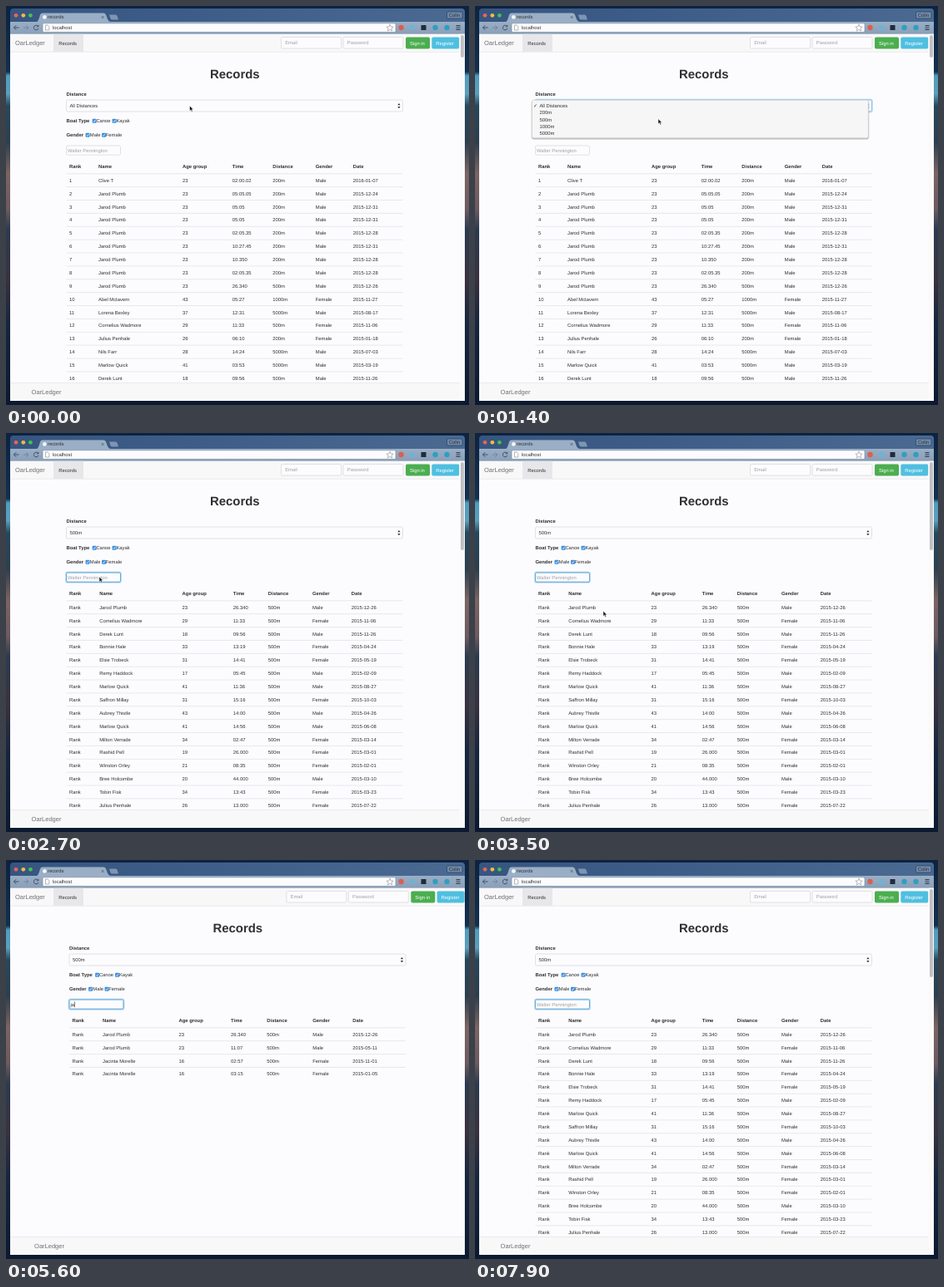
Write an HTML page that moves like this. It is 556 px wide and 480 px high and loops after 8 s.

```html
<!DOCTYPE html>
<html lang="en">
<head>
<meta charset="utf-8">
<title>records</title>
<style>
  html, body { margin: 0; width: 100%; height: 100%; overflow: hidden; background: #0b1a30; }
  svg { display: block; width: 556px; height: 480px; }
  text {
    font: 5.85px "Liberation Sans", Arial, sans-serif;
    fill: #303033;
    text-rendering: geometricPrecision;
    white-space: pre;
  }
  .bold { font-weight: 700; }
  .soft { fill: #a0a0a4; }
  .light { fill: #fff; }
  .brand { font-size: 7.5px; fill: #707074; }
  .title { font-size: 14.9px; font-weight: 700; fill: #303033; }
  .check { font-family: "DejaVu Sans", sans-serif; font-size: 6px; }
  .field { fill: #fcfcfe; stroke: #d6d6da; stroke-width: .7; }
  .rule { stroke: #e4e4e9; stroke-width: .8; }
</style>
</head>
<body>
<svg id="stage" viewBox="0 0 556 480" xmlns="http://www.w3.org/2000/svg"></svg>
<script>
const LOOP = 8000, STEP = 100;
const ROW_H = 15.87;

const SITE = 'OarLedger';
const HEADS = ['Rank', 'Name', 'Age group', 'Time', 'Distance', 'Gender', 'Date'];

// name | age | time | distance | gender | date
const ALL = `Clive T|23|02:00.02|200m|Male|2016-01-07
Jarod Plumb|23|05:05.05|200m|Male|2015-12-24
Jarod Plumb|23|05:05|200m|Male|2015-12-31
Jarod Plumb|23|05:05|200m|Male|2015-12-31
Jarod Plumb|23|02:05.35|200m|Male|2015-12-28
Jarod Plumb|23|10:27.45|200m|Male|2015-12-31
Jarod Plumb|23|10.350|200m|Male|2015-12-28
Jarod Plumb|23|02:05.35|200m|Male|2015-12-28
Jarod Plumb|23|26.340|500m|Male|2015-12-26
Abel Mctavern|43|05:27|1000m|Female|2015-11-27
Lorena Bexley|37|12:31|5000m|Male|2015-08-17
Cornelius Wadmore|29|11:33|500m|Female|2015-11-06
Julius Penhale|26|06:10|200m|Female|2015-01-18
Nils Farr|28|14:24|5000m|Male|2015-07-03
Marlow Quick|41|03:53|5000m|Male|2015-03-19
Derek Lunt|18|09:56|500m|Male|2015-11-26`;

const HALF = `Jarod Plumb|23|26.340|500m|Male|2015-12-26
Cornelius Wadmore|29|11:33|500m|Female|2015-11-06
Derek Lunt|18|09:56|500m|Male|2015-11-26
Bonnie Hale|33|13:19|500m|Female|2015-04-24
Elsie Trobeck|31|14:41|500m|Female|2015-05-19
Remy Haddock|17|05:45|500m|Male|2015-02-09
Marlow Quick|41|11:36|500m|Male|2015-08-27
Saffron Millay|31|15:16|500m|Female|2015-10-03
Aubrey Thistle|43|14:00|500m|Male|2015-04-26
Marlow Quick|41|14:56|500m|Male|2015-06-08
Milton Verrade|34|02:47|500m|Female|2015-03-14
Rashid Pell|19|26.000|500m|Female|2015-03-01
Winston Orley|21|08:35|500m|Female|2015-02-01
Bree Holcombe|20|44.000|500m|Male|2015-03-10
Tobin Fisk|34|13:43|500m|Female|2015-03-23
Julius Penhale|26|13.000|500m|Female|2015-07-22`;

const MATCH = `Jarod Plumb|23|26.340|500m|Male|2015-12-26
Jarod Plumb|23|11:07|500m|Male|2015-05-11
Jacinta Morelle|16|02:57|500m|Female|2015-11-01
Jacinta Morelle|16|03:15|500m|Female|2015-01-05`;

const text = (x, y, s, cls = '') => `<text x="${x}" y="${y}" class="${cls}">${s}</text>`;
const rect = (x, y, w, h, fill, r = 0, more = '') =>
  `<rect x="${x}" y="${y}" width="${w}" height="${h}" rx="${r}" fill="${fill}" ${more}/>`;
const field = (x, y, w, h) => `<rect x="${x}" y="${y}" width="${w}" height="${h}" rx="1.6" class="field"/>`;
const dot = (x, y, r, fill) => `<circle cx="${x}" cy="${y}" r="${r}" fill="${fill}"/>`;
const path = (d, fill, more = '') => `<path d="${d}" fill="${fill}" ${more}/>`;
const line = (d, color, w = 1) => path(d, 'none', `stroke="${color}" stroke-width="${w}"`);
const group = (id, body, dx = 0) => `<g id="${id}" transform="translate(${dx})">${body}</g>`;
const gradient = (id, stops, across) =>
  `<linearGradient id="${id}" x2="${across ? 1 : 0}" y2="${across ? 0 : 1}">` +
  stops.map(([at, c]) => `<stop offset="${at}" stop-color="${c}"/>`).join('') + '</linearGradient>';

const defs = '<defs>' +
  gradient('land', [[0, '#0d2340'], [.165, '#12304f'], [.175, '#4f9cc0'], [.22, '#5a9fbc'],
    [.25, '#26485c'], [.34, '#2c3f4e'], [.42, '#7b6463'], [.51, '#6c5a60'], [.56, '#2b3b4f'],
    [.68, '#3a3140'], [.8, '#16263e'], [1, '#0b1a30']]) +
  gradient('strip', [[0, '#36557f'], [.4, '#3d5d88'], [1, '#4a6a92']], true) +
  gradient('bar', [[0, '#9aafc6'], [1, '#899fb8']]) +
  '</defs>';

function chrome() {
  let s = rect(0, 0, 556, 480, 'url(#land)') + rect(0, 0, 556, 4, '#0d2340') + rect(0, 474, 556, 6, '#0b1a30');
  s += path('M5 475V7Q5 3 9 3H547Q551 3 551 7V475Z', 'url(#strip)');
  s += dot(12, 11.3, 2.4, '#f0605a') + dot(20.8, 11.3, 2.4, '#f0bd3e') + dot(29.4, 11.3, 2.4, '#3fc452');
  s += path('M36 19.5Q38.5 19 40 14L41 10.5Q41.7 8.5 44 8.5H117Q119 8.5 120 10.5L122 16Q123.4 19 126 19.5Z', '#9aafc6');
  s += path('M124 10.5H131.5Q133 10.5 133.6 12L135 16.5H128Q126 16.5 125.4 15Z', '#7d95b2');
  s += dot(46.3, 13.4, 2.3, '#f4f6f8') + text(50, 15.3, 'records');
  s += line('M114.6 12l3 3m0-3l-3 3', '#44566c', .7);
  s += rect(529.5, 7, 18.5, 8, '#7089a8', 1, 'stroke="#24405f" stroke-width=".7"') + text(531.8, 13.2, 'Colin');
  s += rect(5, 19, 546, 14.6, 'url(#bar)');
  s += line('M15.5 26H9.5M12.2 23.2L9.4 26l2.8 2.8', '#3f5064') + line('M21 26h6M24.2 23.2L27 26l-2.8 2.8', '#6f859e');
  s += line('M38.4 24.3A2.8 2.8 0 1 0 38.8 27M38.9 22.8v2h-2', '#3f5064');
  s += rect(44, 20.8, 424, 10.6, '#fcfcfe', 1.5, 'stroke="#70859e" stroke-width=".6"');
  s += path('M47.5 23h2.7l1.6 1.6V29h-4.3Z', '#fff', 'stroke="#85858a" stroke-width=".6"');
  s += text(56, 28.2, 'localhost');
  s += path('M461 22.2l1.2 2.7 2.9.3-2.2 1.9.7 2.9-2.6-1.6-2.6 1.6.7-2.9-2.2-1.9 2.9-.3Z', '#fcfcfe', 'stroke="#8a8a90" stroke-width=".6"');
  s += dot(474.5, 26, 3.2, '#d9604f') + dot(488, 26, 3.2, '#6fb3d2') + rect(498.5, 23, 6, 6, '#1e2c3c');
  s += dot(515.5, 26, 3.2, '#2f9fc0') + dot(529.5, 26, 3.2, '#2f9fc0');
  s += line('M540.5 23.6h5M540.5 26h5M540.5 28.4h5', '#35465a', 1.1);
  s += line('M5 33.4H551', '#73879e', .6);
  return s + rect(5, 33.7, 546, 441.3, '#fcfcfe');
}

function navRight() {
  return field(330.5, 37.5, 72, 13.6) + text(335.2, 46.4, 'Email', 'soft') +
    field(405, 37.5, 72, 13.6) + text(409.8, 46.4, 'Password', 'soft') +
    rect(480, 37.5, 29, 14, '#4bae4f', 1.8) + text(485, 46.6, 'Sign in', 'light') +
    rect(511.3, 37.5, 33, 14, '#4fbfe0', 1.8) + text(516.3, 46.6, 'Register', 'light');
}

function tick(x, y) {
  return rect(x, y, 5, 5, '#3b8fe0', 1) + line(`M${x + 1.2} ${y + 2.6}l1 1.1 1.7-2.4`, '#fff', .8);
}

function table(rows, cols, ranked) {
  let s = HEADS.map((h, i) => text(cols[i], 195.3, h, 'bold')).join('');
  rows.split('\n').forEach((row, n) => {
    const y = 201.8 + n * ROW_H;
    s += `<path d="M72.5 ${y}H476.5" class="rule"/>`;
    [ranked ? n + 1 : 'Rank', ...row.split('|')].forEach((cell, i) => { s += text(cols[i], y + 10, cell); });
  });
  return s;
}

function form(distance) {
  return text(245, 87, 'Records', 'title') +
    text(72.5, 108.4, 'Distance', 'bold') + field(72.5, 113, 404, 14) + text(76.4, 122.2, distance) +
    path('M470.3 119.3l1.6-2.3 1.6 2.3ZM470.3 120.9l1.6 2.3 1.6-2.3Z', '#303033') +
    text(72.5, 140.2, 'Boat Type', 'bold') + tick(103.6, 135.8) + text(108.4, 140.2, 'Canoe') +
    tick(127.5, 135.8) + text(132.4, 140.2, 'Kayak') +
    text(72.5, 157.2, 'Gender', 'bold') + tick(95.5, 152.8) + text(100.8, 157.2, 'Male') +
    tick(115, 152.8) + text(119.8, 157.2, 'Female') +
    field(72.5, 168, 65, 11.2);
}

// Pages without a scrollbar are centred a little further right.
function page(id, { distance, rows, cols, ranked, thumb }) {
  const dx = thumb ? 0 : 3.5;
  const nav = rect(5, 33.8, 546, 21.4, '#f8f8f9') + line('M5 55.3H551', '#e6e6ea', .8) +
    rect(57, 33.8, 36, 21.2, '#e7e7ea') + text(11, 47, SITE, 'brand') + text(63.2, 46.7, 'Records');
  const foot = rect(5, 453.4, 546, 21.6, '#f8f8f9') + line('M5 453.4H551', '#e6e6ea', .7) +
    text(30.6 + dx, 466.6, SITE, 'brand');
  const bar = thumb ? rect(544.6, 33.8, 6.4, 441.2, '#fafafb') + rect(546, 35, 4, thumb, '#c0c0c3', 2) : '';
  return group(id, group(id + 'Body', form(distance) + table(rows, cols, ranked), dx) +
    nav + group(id + 'Nav', navRight(), thumb ? 0 : 6.3) + foot + bar);
}

function menu() {
  const items = ['All Distances', '200m', '500m', '1000m', '5000m'];
  return rect(68.5, 116, 404, 45, '#808084', 2.5, 'opacity=".22"') + rect(67.6, 114, 405.8, 46.2, '#808084', 2.5, 'opacity=".3"') +
    rect(68.4, 113.2, 404, 45.6, '#f6f6f6', 2.2, 'stroke="#c6c6ca" stroke-width=".6"') +
    text(70, 122.3, '✓', 'check') +
    items.map((s, i) => text(77.4, 122.3 + i * 8.12, s)).join('');
}

function history() {
  return rect(72.5, 179.4, 65, 31.4, '#fcfcfe', 0, 'stroke="#c8c8cc" stroke-width=".7"') +
    ['Jim Plank', 'JIm', 'Jude'].map((s, i) => text(74, 187.2 + i * 10.3, s)).join('');
}

const ring = (x, y, w, h, color) =>
  rect(x - .7, y - .7, w + 1.4, h + 1.4, 'none', 2, `stroke="${color}" stroke-width="1.6" opacity=".35"`) +
  rect(x, y, w, h, 'none', 1.6, `stroke="${color}" stroke-width=".9"`);

const stage = document.getElementById('stage');
stage.innerHTML = defs + chrome() +
  page('all', { distance: 'All Distances', rows: ALL, cols: [76, 111, 212, 271.8, 320.3, 371.8, 416.8], ranked: true, thumb: 27 }) +
  page('half', { distance: '500m', rows: HALF, cols: [76, 112.2, 211.6, 272.8, 314.8, 368, 414.8], thumb: 106 }) +
  page('match', { distance: '500m', rows: MATCH, cols: [76, 112.6, 204, 266.6, 309.8, 364.8, 412.8] }) +
  group('selectRing', ring(72.5, 113, 404, 14, '#7fbdea')) +
  group('menu', menu()) +
  group('entry', group('inputRing', ring(72.5, 168, 65, 11.2, '#55a5dc')) +
    '<text id="typed" x="74" y="175.8"></text>' +
    rect(0, 170.3, .6, 6.8, '#303033', 0, 'id="caret"') + group('history', history())) +
  group('cursor', path('M0 0V6.2L1.5 4.9 2.5 7.2 3.6 6.7 2.6 4.5H4.5Z', '#111', 'stroke="#fff" stroke-width=".5"'));

const part = id => document.getElementById(id);
const show = (id, on) => { part(id).style.display = on ? '' : 'none'; };

// Value of the last [time, value] pair reached.
const at = (steps, t) => steps.reduce((v, [from, next]) => t >= from ? next : v, steps[0][1]);

const pages = [[0, 'all'], [1700, 'half'], [5000, 'match'], [7400, 'half']];
const focus = [[0, ''], [600, 'select'], [2600, 'input']];
const typing = [[0, ''], [4400, 'j'], [5000, 'ja'], [6700, 'j'], [7400, '']];
const route = [[0, 220.5, 120], [700, 220.5, 120], [1100, 220, 135.7], [1600, 220, 135.7],
  [1900, 186.5, 153], [2400, 112, 173], [2900, 112, 173], [3500, 154, 214.2]];

function place(t) {
  const i = route.findIndex(p => p[0] > t);
  if (i < 0) return route[route.length - 1].slice(1);
  const [a, b] = [route[i - 1], route[i]];
  const k = (t - a[0]) / (b[0] - a[0]), e = k * k * (3 - 2 * k);
  return [1, 2].map(n => a[n] + (b[n] - a[n]) * e);
}

function draw(t) {
  const view = at(pages, t), focused = at(focus, t), word = at(typing, t);
  ['all', 'half', 'match'].forEach(id => show(id, id === view));
  show('menu', t >= 600 && t < 1700);
  show('selectRing', focused === 'select');
  show('inputRing', focused === 'input');
  show('history', word === 'j');
  part('entry').setAttribute('transform', `translate(${view === 'match' ? 3.5 : 0})`);
  const typed = part('typed');
  typed.textContent = word || 'Walter Pennington';
  typed.setAttribute('class', word ? '' : 'soft');
  show('caret', word);
  part('caret').setAttribute('x', 74.3 + (word === 'ja' ? 4.6 : 1.4));
  show('cursor', t < 4400);
  part('cursor').setAttribute('transform', `translate(${place(t).join(' ')})`);
}

const start = performance.now();
function tickFrame() {
  const t = (performance.now() - start) % LOOP;
  draw(Math.floor(t / STEP) * STEP);
  requestAnimationFrame(tickFrame);
}
tickFrame();
</script>
</body>
</html>
```
